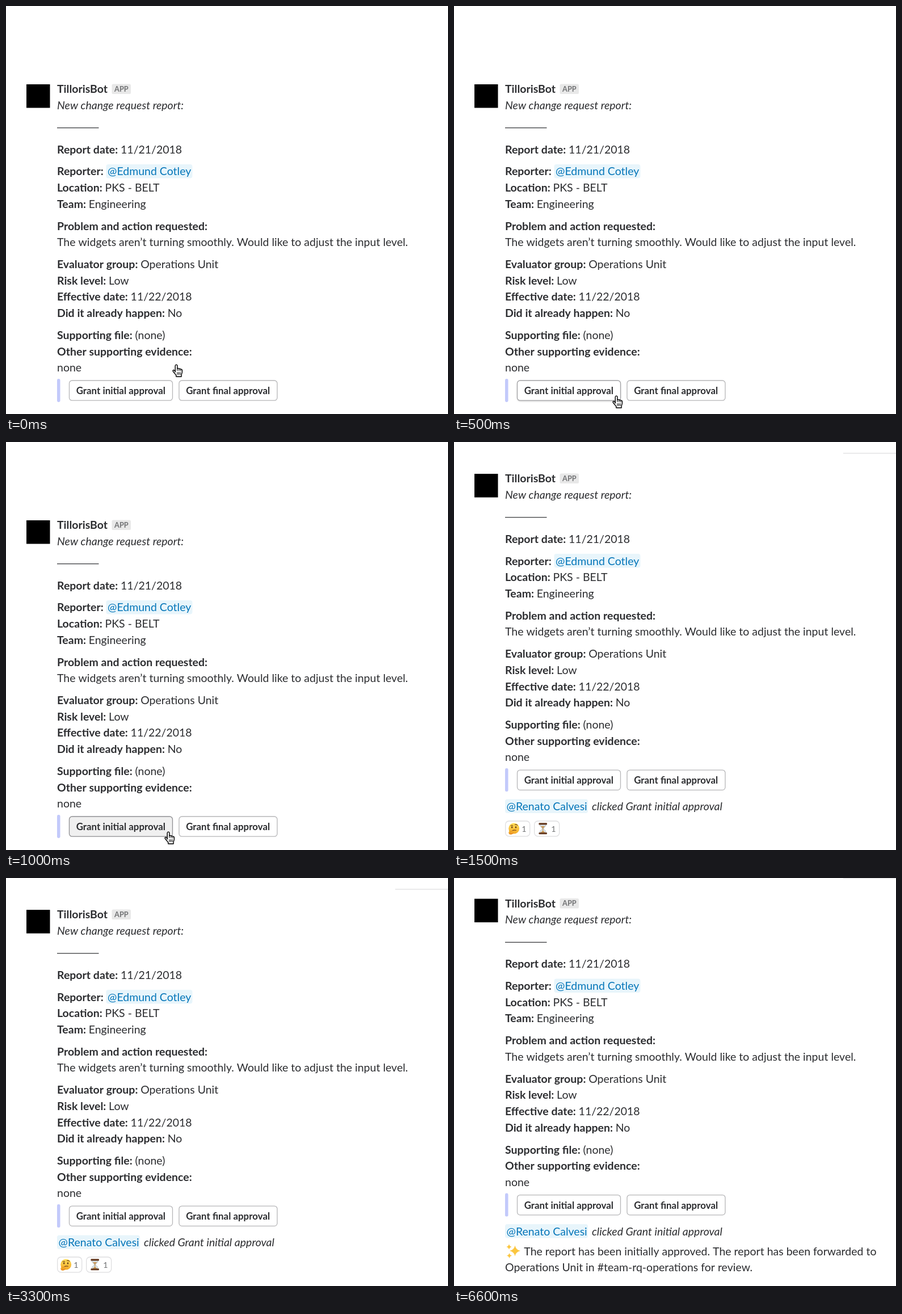
Recreate the animation shown at these times as an HTML page with a canvas. Size 779 px wide and 719 px high, loop 8000 ms.

```html
<!DOCTYPE html>
<html lang="en">
<head>
<meta charset="utf-8">
<title>Change request approval</title>
<style>
  html, body { margin: 0; width: 100%; height: 100%; overflow: hidden; background: #fff; }
  canvas { display: block; }
</style>
</head>
<body>
<canvas id="stage" width="779" height="719"></canvas>
<script>
const ctx = document.getElementById('stage').getContext('2d');
const LOOP = 8000;
const SIZE = 19.5, LINE = 28.6, GAP = 10.37;
const INK = '#2c2d30', GREY = '#717274', LINK = '#0576b9';
const LEFT = 90;

// Hard steps: when each state begins and what it shows.
const steps = [
  { at: 0, scroll: 0, button: 'idle', cursor: [292.3, 631] },
  { at: 500, scroll: 0, button: 'hover', cursor: [278.3, 686] },
  { at: 1000, scroll: 0, button: 'pressed', cursor: [278.3, 686] },
  { at: 1300, scroll: 0, button: 'idle', cursor: [278.3, 686] },
  { at: 1500, scroll: 81.9, button: 'idle', clicked: true, reactions: true },
  { at: 4500, scroll: 101.4, button: 'idle', clicked: true, approved: true }
];

const buttonLooks = {
  idle: { fill: '#fff', edge: '#b6b6b8' },
  hover: { fill: '#fff', edge: '#a2a2a5', shadow: true },
  pressed: { fill: '#f0f0f0', edge: '#8f8f92' }
};

// Paragraphs of lines, each a bold label and a plain value.
const paragraphs = [
  [['Report date: ', '11/21/2018']],
  [['Reporter: ', '@Edmund Cotley'], ['Location: ', 'PKS - BELT'], ['Team: ', 'Engineering']],
  [
    ['Problem and action requested:', ''],
    ['', 'The widgets aren’t turning smoothly. Would like to adjust the input level.']
  ],
  [
    ['Evaluator group: ', 'Operations Unit'],
    ['Risk level: ', 'Low'],
    ['Effective date: ', '11/22/2018'],
    ['Did it already happen: ', 'No']
  ],
  [['Supporting file: ', '(none)'], ['Other supporting evidence:', ''], ['', 'none']]
];

const hand = new Path2D('M6 14V3.2C6 .4 9.6 .4 9.6 3.2V8.4C10 6.9 12.6 7.1 12.7 8.9' +
  'C13.4 7.6 15.6 8 15.7 9.8C16.6 8.8 18.3 9.5 18.3 11.2C18.4 15 17.6 16.6 16.8 18.4V22H7.6V19.6' +
  'C6 17.6 4.6 15.6 2.4 13.2C.8 11.2 2.8 9.6 4.4 11.2L6 13Z');

// Draws a run of text and returns the x where it ends.
function text(str, x, y, style = '', color = INK, size = SIZE) {
  ctx.font = `${style} ${size}px Lato, sans-serif`;
  ctx.fillStyle = color;
  ctx.fillText(str, x, y);
  return x + ctx.measureText(str).width;
}

function box(x, y, w, h, r, fill, edge) {
  ctx.beginPath();
  ctx.roundRect(x, y, w, h, r);
  if (fill) { ctx.fillStyle = fill; ctx.fill(); }
  if (edge) { ctx.strokeStyle = edge; ctx.lineWidth = 1.3; ctx.stroke(); }
}

function ellipse(x, y, rx, ry, fill, turn = 0) {
  ctx.beginPath();
  ctx.ellipse(x, y, rx, ry, turn, 0, Math.PI * 2);
  ctx.fillStyle = fill;
  ctx.fill();
}

function curve(d, color, width) {
  ctx.strokeStyle = color;
  ctx.lineWidth = width;
  ctx.lineCap = 'round';
  ctx.stroke(new Path2D(d));
}

function at(x, y, draw) {
  ctx.save();
  ctx.translate(x, y);
  draw();
  ctx.restore();
}

function mention(name, x, w, baseline) {
  box(x, baseline - 19.5, w, 24.5, 4, '#e8f5fb');
  text(name, x + 2.6, baseline, '', LINK);
}

function button(label, x, w, look) {
  const { fill, edge, shadow } = buttonLooks[look];
  ctx.save();
  if (shadow) {
    ctx.shadowColor = 'rgba(0,0,0,.22)';
    ctx.shadowBlur = 3;
    ctx.shadowOffsetY = 1.3;
  }
  box(x, 660, w, 35.2, 5, fill);
  ctx.restore();
  box(x, 660, w, 35.2, 5, null, edge);
  text(label, x + 12.2, 684, 'bold', INK, 16.9);
}

function thinkingFace() {
  const skin = ctx.createLinearGradient(0, -10, 0, 10);
  skin.addColorStop(0, '#ffdf5a');
  skin.addColorStop(1, '#f3a928');
  ellipse(0, -.3, 9.5, 9.5, skin);
  ellipse(-3.5, -2.4, 1.2, 1.7, '#5b3515');
  ellipse(3.3, -2.4, 1.2, 1.7, '#5b3515');
  curve('M-5.6 -5.2Q-3.8 -6.4 -2 -5.4M1.7 -6.7Q4 -8 6 -5.9', '#75451a', 1.1);
  curve('M-2.4 3.4Q.5 1.8 3.6 3', '#75451a', 1.2);
  ellipse(-5, 7, 4.4, 3.3, '#eb9224', -.3);
  curve('M-7.8 6.5L-7.2 2.8M-5 6.3L2.2 4.8', '#f4b22e', 2.2);
}

function hourglass() {
  const glass = new Path2D('M-5.6 -7.5C-5.6 -2.8 -1.2 -2 -1.2 0C-1.2 2 -5.6 2.8 -5.6 7.5' +
    'H5.6C5.6 2.8 1.2 2 1.2 0C1.2 -2 5.6 -2.8 5.6 -7.5Z');
  ctx.fillStyle = '#dce5e9';
  ctx.fill(glass);
  ctx.strokeStyle = '#a7b2b8';
  ctx.lineWidth = .8;
  ctx.stroke(glass);
  ctx.fillStyle = '#c89655';
  ctx.fill(new Path2D('M-3.8 -4.3H3.8L.6 -.8V4L4.6 7.5H-4.6L-.6 4V-.8Z'));
  box(-7.3, -10, 14.6, 3.1, 1.2, '#64391f');
  box(-7.3, 6.9, 14.6, 3.1, 1.2, '#64391f');
}

function sparkle(x, y, r) {
  const q = r * .16;
  ctx.beginPath();
  ctx.moveTo(x, y - r);
  ctx.quadraticCurveTo(x + q, y - q, x + r, y);
  ctx.quadraticCurveTo(x + q, y + q, x, y + r);
  ctx.quadraticCurveTo(x - q, y + q, x - r, y);
  ctx.quadraticCurveTo(x - q, y - q, x, y - r);
  ctx.fillStyle = '#fbc63f';
  ctx.fill();
}

function reaction(x, w, icon) {
  box(x, 749.9, w, 26.8, 6, '#fff', '#dedee0');
  at(x + 15, 763.2, icon);
  text('1', x + w - 14.5, 768.6, '', GREY, 14.3);
}

function report() {
  let y = 259.5;
  for (const lines of paragraphs) {
    for (const [label, value] of lines) {
      const x = text(label, LEFT, y, 'bold');
      if (value.startsWith('@')) mention(value, x, 152, y);
      else text(value, x, y);
      y += LINE;
    }
    y += GAP;
  }
}

function message(step) {
  ctx.fillStyle = '#000';
  ctx.fillRect(36, 138, 41.5, 41.5);
  text('TillorisBot', LEFT, 153, 'bold');
  box(186.5, 137.5, 33.5, 17.5, 2.6, '#e8e8e8');
  text('APP', 191, 150.8, 'bold', GREY, 12.8);
  text('New change request report:', LEFT, 181.6, 'italic');
  ctx.fillStyle = INK;
  ctx.fillRect(LEFT, 214.1, 73.5, 1.2);
  report();

  box(90, 657, 5.5, 41, 2.4, '#c3cafb');
  button('Grant initial approval', 111.5, 182, step.button);
  button('Grant final approval', 305, 173, 'idle');

  if (step.clicked) {
    ctx.fillStyle = '#e2e2e4';
    ctx.fillRect(686, 101, 93, 1.4);
    mention('@Renato Calvesi', LEFT, 146, 730.9);
    text('clicked Grant initial approval', 243, 730.9, 'italic');
  }
  if (step.reactions) {
    reaction(90.7, 43, thinkingFace);
    reaction(141.7, 44, hourglass);
  }
  if (step.approved) {
    sparkle(107.5, 758.5, 9.5);
    sparkle(97, 751.5, 5);
    sparkle(97.5, 767, 4.8);
    text('The report has been initially approved. The report has been forwarded to', 123.3, 766);
    text('Operations Unit in #team-rq-operations for review.', LEFT, 794.6);
  }
}

function cursor() {
  ctx.save();
  ctx.shadowColor = 'rgba(0,0,0,.3)';
  ctx.shadowBlur = 2.5;
  ctx.shadowOffsetY = 1;
  ctx.fillStyle = '#fff';
  ctx.fill(hand);
  ctx.restore();
  ctx.lineJoin = 'round';
  ctx.lineWidth = 1.4;
  ctx.strokeStyle = '#000';
  ctx.stroke(hand);
  curve('M9.6 8.4V11.5M12.7 9V11.8M15.7 10V12M9.7 14.5V18.5M12.2 14.5V18.5M14.7 14.5V18.5', '#000', 1.1);
}

const start = performance.now();

function frame() {
  const time = (performance.now() - start) % LOOP;
  const step = steps.findLast(s => time >= s.at);
  ctx.fillStyle = '#fff';
  ctx.fillRect(0, 0, 779, 719);
  at(0, -step.scroll, () => message(step));
  if (step.cursor) at(...step.cursor, cursor);
  requestAnimationFrame(frame);
}
frame();
</script>
</body>
</html>
```
